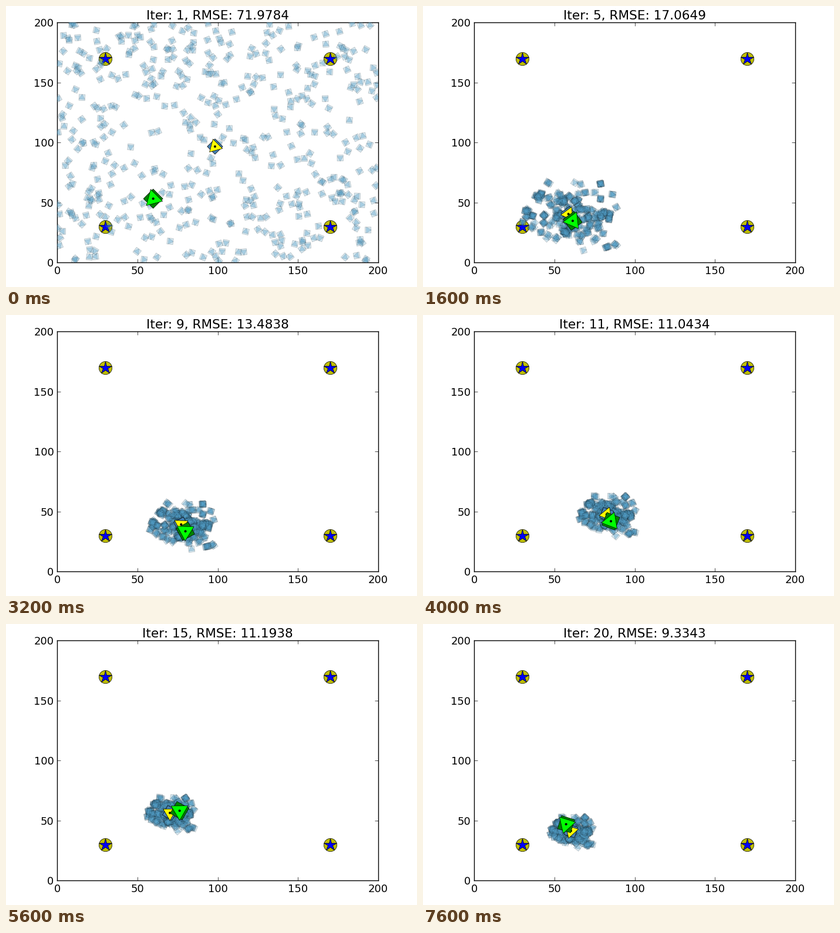
Write a matplotlib script that moves like this. It is 700 by 480 pixels and loops after 8000 ms.

```python
import numpy as np
import matplotlib.pyplot as plt
from matplotlib.animation import FuncAnimation
from matplotlib.collections import PolyCollection
from matplotlib.colors import to_rgba

WIDTH, HEIGHT, DPI = 700, 480, 100
LEFT, RIGHT, TOP, BOTTOM = 87.1, 634.1, 28.1, 438.1
SCALE = np.array([RIGHT - LEFT, BOTTOM - TOP]) / 200
ITERATIONS, INTERVAL = 20, 400

PARTICLES, CLUMPS = 450, 120
ORBIT_CENTER, ORBIT_RADIUS = np.array([71.3, 44.8]), 14.2
TURN = np.radians(20.4)
FIRST_GUESS = np.array([98.3, 96.6])
ERROR_POINTS = {1: 71.9784, 3: 18.2058, 7: 15.9241, 11: 11.0434,
                15: 11.1938, 17: 10.1432, 20: 9.3343}


def direction(angle):
    return np.array([np.cos(angle), np.sin(angle)])


def polygon(center, radius, angle, sides):
    """Regular polygon with a pixel radius, in data coordinates."""
    corners = angle + 2 * np.pi * np.arange(sides) / sides
    return center + radius * direction(corners).T / SCALE


def body(center, angle, square_radius, triangle_radius):
    return [polygon(center, square_radius, angle + np.pi / 4, 4),
            polygon(center, triangle_radius, angle, 3)]


def robot_at(iteration):
    phase = np.radians(144) + TURN * (iteration - 1)
    return ORBIT_CENTER + ORBIT_RADIUS * direction(phase), phase + np.radians(81)


def estimate_at(iteration, robot):
    """The guess lags behind; its offset starts to turn halfway through."""
    if iteration == 1:
        return FIRST_GUESS
    return robot + 6.3 * direction(np.radians(115) + TURN * max(0, iteration - 11))


rng = np.random.default_rng(12)
start_positions = rng.uniform(0, 200, (PARTICLES, 2))
start_angles = rng.uniform(0, 2 * np.pi, PARTICLES)
# After the first step, survivors are noisy copies of a few parents
parent = (CLUMPS * rng.random(PARTICLES) ** 1.4).astype(int)
offsets = rng.normal(0, 1, (CLUMPS, 2))[parent]
tilts = rng.normal(0, 0.8, CLUMPS)[parent] + rng.normal(0, 0.08, PARTICLES)
jitter = rng.normal(0, 0.5, (PARTICLES, 2))


def particles_at(iteration, estimate, angle):
    if iteration == 1:
        return start_positions, start_angles
    spread = 5 + 11 * np.exp(-(iteration - 3) / 5)
    return estimate + spread * offsets + jitter, angle + tilts


plt.rcParams.update({"font.family": "DejaVu Sans", "font.size": 13})
fig = plt.figure(figsize=(WIDTH / DPI, HEIGHT / DPI), dpi=DPI, facecolor="white")
ax = fig.add_axes([LEFT / WIDTH, 1 - BOTTOM / HEIGHT,
                   (RIGHT - LEFT) / WIDTH, (BOTTOM - TOP) / HEIGHT])
ax.set(xlim=(0, 200), ylim=(0, 200),
       xticks=range(0, 201, 50), yticks=range(0, 201, 50))
ax.tick_params(direction="in", length=4, width=0.5, pad=4, top=True, right=True)
for spine in ax.spines.values():
    spine.set_linewidth(1)
title = ax.set_title("", fontsize=15.6, pad=4)

for x in (30, 170):
    for y in (30, 170):
        for marker, color in (("o", "y"), ("*", "b")):
            ax.plot(x, y, marker, color=color, ms=16, mec="black", mew=0.5, zorder=1)

swarm = PolyCollection([], facecolors=[to_rgba("#539fc8", 0.24), to_rgba("#539fc8", 0.36)],
                       edgecolors=[to_rgba("black", 0.22), to_rgba("black", 0.15)],
                       linewidths=0.5, zorder=3)
robots = PolyCollection([], facecolors=["steelblue", "yellow", "black",
                                        "green", "lime", "black"],
                        edgecolors="black", linewidths=0.5, zorder=4)
ax.add_collection(swarm, autolim=False)
ax.add_collection(robots, autolim=False)


def draw(frame):
    iteration = frame + 1
    robot, angle = robot_at(iteration)
    estimate = estimate_at(iteration, robot)

    shapes = []
    for position, facing in zip(*particles_at(iteration, estimate, angle)):
        shapes += body(position, facing, 7.3, 5.8)
    swarm.set_verts(shapes)

    shapes = []
    for center, radius in ((estimate, 13.2), (robot, 16.5)):
        shapes += body(center, angle, radius, radius)
        shapes.append(polygon(center, 1.7, 0, 16))
    robots.set_verts(shapes)

    error = np.interp(iteration, list(ERROR_POINTS), list(ERROR_POINTS.values()))
    title.set_text(f"Iter: {iteration}, RMSE: {error:.4f}")
    return swarm, robots, title


anim = FuncAnimation(fig, draw, frames=ITERATIONS, interval=INTERVAL,
                     repeat=True, repeat_delay=0, blit=False)
plt.show()
```
